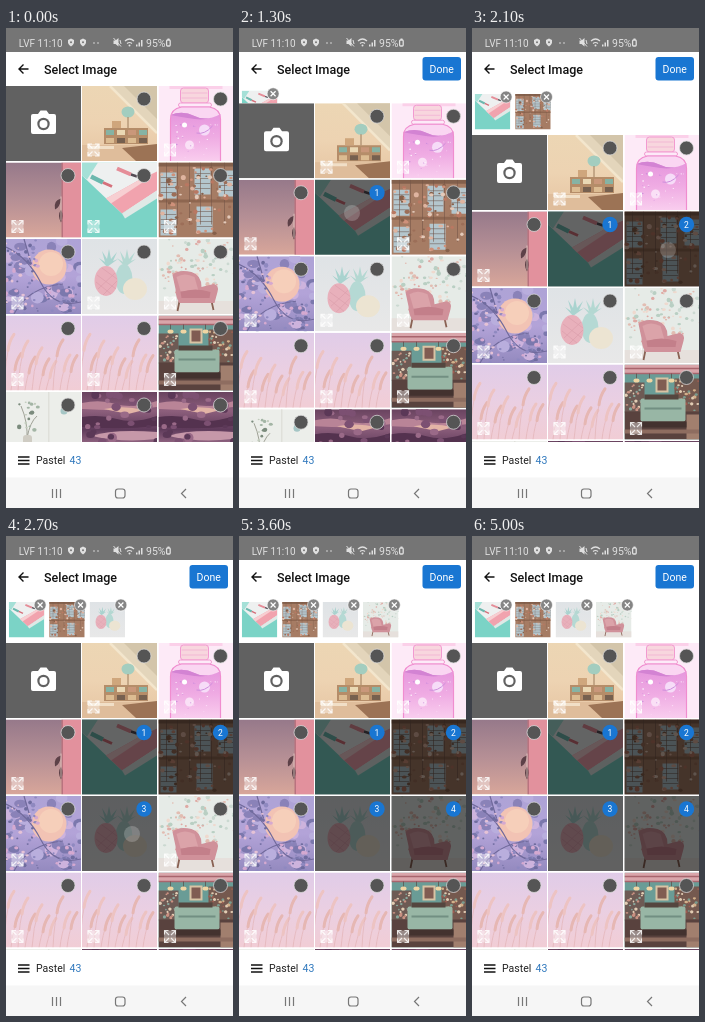
Write an HTML page that moves like this. It is 227 by 480 pixels and loops after 5.6 s.

```html
<!DOCTYPE html>
<html lang="en">
<head>
<meta charset="utf-8">
<title>Select Image</title>
<style>
html, body { margin: 0; width: 100%; height: 100%; overflow: hidden; background: #fff; }
svg { display: block; width: 100vw; height: 100vh; }
text { font-family: Roboto, "Noto Sans", sans-serif; }
</style>
</head>
<body>
<svg id="stage" viewBox="0 0 227 480"></svg>
<script>
const LOOP = 5600, STEP = 100, ROW = 76.5, TRAY = 49, BLUE = '#1976d2';
const COLS = [0, 76, 152.5];

// Shape helpers
const rect = (x, y, w, h, fill, more = '') => `<rect x="${x}" y="${y}" width="${w}" height="${h}" fill="${fill}" ${more}/>`;
const oval = (x, y, rx, ry, fill, more = '') => `<ellipse cx="${x}" cy="${y}" rx="${rx}" ry="${ry}" fill="${fill}" ${more}/>`;
const disc = (x, y, r, fill, more) => oval(x, y, r, r, fill, more);
const path = (d, fill) => `<path d="${d}" fill="${fill}"/>`;
const line = (d, color, w = 1, more = '') => `<path d="${d}" fill="none" stroke="${color}" stroke-width="${w}" ${more}/>`;
const text = (x, y, size, fill, s, more = '') => `<text x="${x}" y="${y}" font-size="${size}" fill="${fill}" ${more}>${s}</text>`;

let gradients = '';
function gradient(id, ...colors) {
  const stops = colors.map((c, i) => `<stop offset="${i / (colors.length - 1)}" stop-color="${c}"/>`);
  gradients += `<linearGradient id="${id}" x2="0" y2="1">${stops.join('')}</linearGradient>`;
  return `url(#${id})`;
}
const sky = (id, ...colors) => rect(0, 0, 75, 75, gradient(id, ...colors));

function seeded(seed) {
  return () => (seed = seed * 16807 % 2147483647) / 2147483647;
}

function specks(seed, n, [x, y, w, h], colors, min, max) {
  const rnd = seeded(seed * 7919);
  let out = '';
  for (let i = 0; i < n; i++) {
    const r = min + rnd() * (max - min);
    out += oval((x + rnd() * w).toFixed(1), (y + rnd() * h).toFixed(1), r.toFixed(1), (r * (.6 + rnd() * .5)).toFixed(1), colors[i % colors.length]);
  }
  return out;
}

// Photos, each 75 by 75
const camera = () => rect(0, 0, 75, 75, '#616161')
  + path('M27 28h5l2.5-3.5h6l2.5 3.5h5q2 0 2 2v16q0 2-2 2h-21q-2 0-2-2v-16q0-2 2-2z', '#fff')
  + disc(37.5, 38, 6.2, '#616161') + disc(37.5, 38, 4, '#fff');

const attic = () => sky('attic', '#ecd6b4', '#edd3b2', '#e6c5a3')
  + path('M28 0H75V47Z', '#e3d5bb') + path('M42 0H75V33Z', '#d3c5aa') + line('M28 0L75 47', '#f3e6cd', 2.5)
  + rect(0, 59, 75, 16, '#dfbd9b') + rect(22, 42, 44, 16, '#b58d69')
  + [0, 1, 2, 3].map(i => rect(24 + i * 11, 44, 8, 5, ['#86b3a4', '#ead8b4', '#c9977a'][i % 3]) + rect(24 + i * 11, 52, 8, 5, ['#dcbc92', '#76604f'][i % 2])).join('')
  + oval(46, 26, 6.5, 5.5, '#a3cdbf') + line('M46 31v11', '#9c7c5d') + rect(30, 35, 9, 7, '#cfa67c')
  + path('M40 62L75 58V75H54Z', '#9c7355') + rect(6, 60, 26, 3, '#f1dfc7');

const bottle = () => rect(0, 0, 75, 75, '#fdeaf7')
  + rect(11, 0, 53, 3, '#fbd0e9') + rect(22, 2, 28, 15, '#f8d6de', 'rx="3" stroke="#f29ad0"')
  + line('M23 7H49M23 12H49', '#f3b9d6', 1.2) + rect(20, 17, 33, 4, '#fdeaf8', 'stroke="#f29ad0" rx="2"')
  + path('M23 21H51Q62 23 62 33V75H12V33Q12 23 23 21Z', '#fad6f2')
  + path('M12 29Q24 24 36 30T62 28V75H12Z', gradient('potion', '#e596dd', '#efabe3', '#f9cdee'))
  + path('M12 29Q24 24 36 30T62 28Q50 35 36 33T12 29Z', '#d383d3')
  + line('M23 21H51Q62 23 62 33V75M12 75V33Q12 23 23 21', '#f08dcf', 1.2)
  + disc(46, 44, 5.5, '#f6dcf8') + line('M38 47Q46 49 54 40', '#cd8fdd') + disc(26, 39, 2.5, '#fff') + disc(31, 59, 4.5, '#fae0f6')
  + specks(4, 26, [15, 36, 44, 36], ['#fff', '#fbe0f8', '#cf8fdc'], .4, .9);

const dusk = () => sky('dusk', '#96798a', '#b58f95', '#d8a69a')
  + rect(57, 0, 18, 75, '#e2919d') + rect(55.5, 0, 1.5, 75, '#b9737f')
  + path('M55 36q-8 2-6 11q5-2 6-11zM55 47q-4 6 0 13q3-7 0-13z', '#5d4148') + line('M55 34v24', '#e8cfc6', .8);

const desk = () => rect(0, 0, 75, 75, '#7bd3c6')
  + path('M0 0H75V30L40 51L0 13Z', '#eef0f0') + path('M0 0H16L5 17L0 13Z', '#a5e0d7')
  + path('M24 36L58 17L75 9V28L40 51Z', '#f1a3ae') + path('M24 36L58 17L62 19L29 41Z', '#f7cfd2')
  + path('M40 51L75 28V36L43 56Z', '#dfe9e6')
  + line('M9 14l12 6', '#6cb8ae', 4.5) + line('M21 20l9 4', '#d5707b', 3) + line('M35 6l14 6', '#e58d98', 4) + line('M49 12l6 2', '#544c55', 2.5);

const blinds = (x, y) => rect(x, y, 16, 26, '#b4c6cd') + line(`M${x} ${y + 5}h16m-16 5h16m-16 5h16m-16 5h16`, '#8d8a88', 1);
const curtain = () => rect(0, 0, 75, 75, '#a67c64')
  + blinds(2, 10) + blinds(36, 6) + blinds(60, 8) + blinds(2, 47) + blinds(38, 44)
  + rect(0, 0, 75, 4, '#83604c') + rect(0, 37, 75, 3, '#8e6650')
  + [8, 19, 31, 42, 53, 66].map(x => line(`M${x} 0V62`, '#765748', .6)).join('')
  + specks(8, 75, [2, 5, 71, 66], ['#cf917a', '#b97862', '#dfb4a0', '#86604b', '#e3c9b9', '#9c6e58'], 1, 2.8);

const moon = () => sky('night', '#aea3d6', '#b3a3d8', '#948abf')
  + specks(13, 34, [0, 0, 75, 75], ['#b9aedd', '#8a82b8', '#cdb3dd', '#7b78ad'], 3, 7)
  + disc(43, 28, 17.5, '#f2c3b4') + disc(45, 25, 12, '#f6cfba')
  + line('M0 8Q22 18 35 44T75 63M8 75Q22 48 57 45M18 0L25 24', '#716a9c', 1.2)
  + specks(17, 60, [0, 0, 32, 75], ['#6f6c9f', '#d5a9d0', '#8f89c0', '#e5c2d6'], .8, 2.3)
  + specks(19, 30, [30, 46, 45, 29], ['#6f6c9f', '#d5a9d0', '#8f89c0'], .8, 2.3);

const leaves = (x, y, color) => path(`M${x} ${y}l-8-9 6 4-3-11 5 8 2-10 2 10 6-7-4 9 5-2z`, color);
const pineapples = () => sky('studio', '#dfe3e6', '#e8e8e8')
  + leaves(25, 28, '#a9d3cf') + leaves(43, 28, '#b4d8d2')
  + oval(42, 40, 8.5, 15, '#b5d9d4') + oval(53, 50, 12, 11, '#ece4d2') + oval(24, 42, 11.5, 15, '#e8b0bb')
  + line('M15 36l19 14M14 43l15 12M20 29l15 11M33 34L16 50M35 42L21 56', '#dc9fac', .7);

const chair = () => rect(0, 0, 75, 75, '#e6ebe7')
  + specks(21, 95, [0, 0, 75, 54], ['#e2bdb2', '#b9cfc3', '#efd9ce', '#cbd9d1', '#dfa9a4'], .7, 2.3)
  + rect(0, 62, 75, 13, '#e6e0dc') + line('M21 62l-2 10M53 62l2 9', '#8a6254', 1.8)
  + path('M14 36Q20 30 33 33Q43 36 43 48L55 45Q61 46 59 53L56 64H21Q17 58 17 50Z', '#d0919a')
  + path('M18 38Q26 33 36 38L40 52H22Z', '#dba3a9') + path('M22 53Q37 48 52 53L51 59H23Z', '#c37f8a');

function reeds() {
  const rnd = seeded(3571);
  let out = sky('haze', '#e0cce8', '#eacfe2', '#f1cdd5');
  for (let i = 0; i < 10; i++) {
    const x = i * 7 - 2, y = 22 + rnd() * 28;
    out += line(`M${x} 75Q${x + 1} ${y + 20} ${x + 7} ${y}`, '#e3b3b6', .7);
    out += line(`M${x + 4} ${y + 12}Q${x + 5} ${y + 3} ${x + 10} ${y - 4}`, i % 2 ? '#e6b7b3' : '#edc3c2', 3, 'stroke-linecap="round"');
  }
  return out;
}

const cafe = () => rect(0, 0, 75, 75, '#6a9c96')
  + rect(0, 0, 75, 9, '#d9a5aa') + line('M0 4H75M0 9H75', '#a8656d', 1.3)
  + rect(0, 18, 20, 30, '#6d5a54') + rect(50, 14, 25, 34, '#75594f')
  + specks(31, 34, [51, 16, 23, 30], ['#d3b08a', '#9f5d51', '#e2cdb4', '#7a9b8e'], .8, 1.8)
  + specks(33, 26, [1, 20, 18, 26], ['#c99182', '#e2cdb4', '#88a79b'], .8, 1.8)
  + rect(31, 13, 13, 15, '#d8c3a4') + rect(33, 15, 9, 11, '#805c52')
  + [12, 25, 47].map(x => line(`M${x} 9v6`, '#594b45', .7) + oval(x, 16, 3, 2, '#f0d5a3')).join('')
  + rect(0, 47, 75, 28, '#59423e') + rect(62, 50, 13, 25, '#a17f6e')
  + rect(16, 34, 45, 23, '#98b6a5', 'rx="2"') + rect(20, 30, 34, 5, '#54463f') + rect(20, 43, 37, 2, '#728f82')
  + rect(18, 57, 44, 6, '#43322f') + rect(0, 65, 75, 4, '#8e6d60');

const vase = () => rect(0, 0, 75, 75, '#eceeea') + rect(42, 0, 1.5, 75, '#dfe0da')
  + line('M21 48Q22 30 15 14M21 46Q24 30 31 24', '#8d8f82', .8)
  + specks(41, 16, [10, 10, 22, 32], ['#a3b5a5', '#c2ccbd', '#7b8b7d'], .8, 2.2)
  + disc(58, 19, 3.5, '#a5c6c5') + rect(17, 43, 9, 14, '#cfccc3', 'rx="3"') + rect(0, 56, 75, 19, '#d9cdbc');

const sea = () => sky('sunset', '#69435f', '#8d5f7c', '#5f3b5b', '#a3738f', '#8b6186')
  + path('M0 11Q18 7 34 12T75 9V15Q45 20 0 17Z', '#b98497') + path('M22 17Q42 13 62 18L46 22Z', '#e3b4a6')
  + path('M0 25Q18 22 35 27T75 24V34Q40 38 0 35Z', '#54324f') + path('M10 44Q30 37 75 40V47Q40 51 10 44Z', '#c698a9')
  + specks(47, 26, [0, 2, 75, 48], ['#7c5072', '#9a6a88', '#5b3857'], 2, 5)
  + line('M0 55H32M39 60H75', '#744968', 2);

const photos = [camera, attic, bottle, dusk, desk, curtain, moon, pineapples, chair, reeds, reeds, cafe, vase, sea, sea];
const symbols = photos.map((draw, i) => `<symbol id="photo${i}" viewBox="0 0 75 75">${draw()}</symbol>`).join('');
const photo = (i, x, y, size) => `<use href="#photo${i}" x="${x}" y="${y}" width="${size}" height="${size}"/>`;

// Taps: time, photo, and place of the touch dot
const taps = [[1100, 4, 113, 185], [1900, 5, 196, 222], [2500, 7, 126, 298], [3100, 8, 201, 298]];

const expand = rect(5.5, 58, 12, 12, '#fff', 'fill-opacity=".38"')
  + line('M6 62v-4h4M13 58h4v4M17 66v4h-4M10 70h-4v-4M6.500 58.500l4 4M16.500 58.500l-4 4M16.500 69.500l-4-4M6.500 69.500l4-4', '#fff', 1.1, 'opacity=".8"');

const tiles = photos.map((_, i) => {
  const n = taps.findIndex(tap => tap[1] === i);
  const mark = !i ? '' : `<g id="free${i}">${expand}${disc(62, 13, 7, '#555', 'stroke="#ddd" stroke-opacity=".75"')}</g>`;
  const chosen = n < 0 ? '' : `<g id="chosen${n}">${rect(0, 0, 75, 75, '#000', 'fill-opacity=".58"')}`
    + disc(62, 13, 7.7, BLUE) + text(62, 16, 8.5, '#fff', n + 1, 'text-anchor="middle"') + '</g>';
  return `<g transform="translate(${COLS[i % 3]} ${Math.floor(i / 3) * ROW})">${photo(i, 0, 0, 75)}${mark}${chosen}</g>`;
}).join('');

const thumbs = taps.map(([, i], n) => {
  const x = 2.8 + n * 40.4;
  return `<g id="thumb${n}">${photo(i, x, 66, 35.5)}${disc(x + 31.3, 69, 6, '#858585', 'stroke="#fff" stroke-width=".6"')}`
    + line(`M${x + 28.8} 66.5l5 5m0-5l-5 5`, '#fff', 1.2) + '</g>';
}).join('');

const LIGHT = '#e0e0e0';
const shield = x => path(`M${x - 3} 12l3-1.500 3 1.500v3q-1 2.500-3 3.500q-2-1-3-3.500z`, LIGHT) + disc(x, 14.2, 1, '#757575');

const status = rect(0, 0, 227, 24, '#757575')
  + text(56.5, 18.7, 10, LIGHT, 'LVF 11:10', 'text-anchor="end"') + shield(65) + shield(77)
  + disc(88, 15, .8, LIGHT) + disc(92, 15, .8, LIGHT)
  + path('M107.500 12.500h2l3-2.500v8.500l-3-2.500h-2z', LIGHT) + line('M107.500 10l7.500 8.500M114 12l1 4', LIGHT, 1)
  + line('M119 13q4.500-4 9 0M121 15.500q2.500-2 5 0', LIGHT, 1.2) + disc(123.5, 17.5, 1, LIGHT)
  + path('M130 18.500v-2h1.500v2zM132.500 18.500v-4h1.500v4zM135 18.500v-6.500h1.500v6.500z', LIGHT)
  + text(140, 18.7, 10.5, LIGHT, '95%')
  + rect(160.6, 12, 3.6, 6, 'none', `stroke="${LIGHT}" stroke-width="1.3" rx="1"`) + rect(161.5, 10.5, 2, 1.5, LIGHT);

const header = rect(0, 24, 227, 34, '#fff')
  + line('M22.500 41H13.500M17.500 36.500L13 41l4.500 4.500', '#111', 1.4)
  + text(38, 45.7, 12.5, '#111', 'Select Image', 'font-weight="500"')
  + `<g id="done">${rect(183.5, 29, 38.5, 23.5, BLUE, 'rx="3"')}${text(202.7, 44.7, 10.5, '#fff', 'Done', 'text-anchor="middle"')}</g>`;

const footer = rect(0, 414, 227, 36, '#fff') + line('M12 429h11.500M12 432.500h11.500M12 436h11.500', '#111', 1.4)
  + text(30, 436, 10.5, '#222', 'Pastel') + text(63.5, 436, 10.5, '#2f78bd', '43')
  + rect(0, 449.5, 227, 30.5, '#f6f6f6') + line('M46.500 461v9M50.500 461v9M54.500 461v9', '#777', 1.2)
  + rect(109.5, 461, 9.5, 9, 'none', 'stroke="#777" stroke-width="1.2" rx="2.5"') + line('M180 461l-4.500 4.500 4.500 4.500', '#777', 1.2);

const stage = document.getElementById('stage');
stage.innerHTML = `<defs>${gradients}${symbols}</defs>${rect(0, 0, 227, 480, '#fff')}
  <g id="tray">${thumbs}</g><g id="grid">${rect(0, 0, 227, 420, '#fff')}${tiles}</g>
  ${disc(0, 0, 8, '#fff', 'id="touch"')}${status}${header}${footer}`;

const el = id => document.getElementById(id);
const show = (id, on) => el(id).setAttribute('visibility', on ? 'visible' : 'hidden');
const clamp = v => Math.min(1, Math.max(0, v));

function draw(t) {
  const p = clamp((t - taps[0][0] - 100) / 250);
  const open = p * p * (3 - 2 * p);
  el('grid').setAttribute('transform', `translate(0 ${58 + TRAY * open})`);
  el('tray').setAttribute('transform', `translate(0 ${-5 * (1 - open)})`);
  show('done', t >= taps[0][0] + 100);
  let glow = 0;
  taps.forEach(([start, i, x, y], n) => {
    const age = t - start, on = age >= 100;
    show('chosen' + n, on);
    show('thumb' + n, on);
    show('free' + i, !on);
    if (age >= 0 && age < 400) {
      glow = .32 * (1 - clamp((age - 100) / 300));
      el('touch').setAttribute('transform', `translate(${x} ${y})`);
    }
  });
  el('touch').setAttribute('opacity', glow);
}

let last = -1;
function tick() {
  const t = Math.floor(performance.now() % LOOP / STEP) * STEP;
  if (t !== last) draw(last = t);
  requestAnimationFrame(tick);
}
tick();
</script>
</body>
</html>
```
